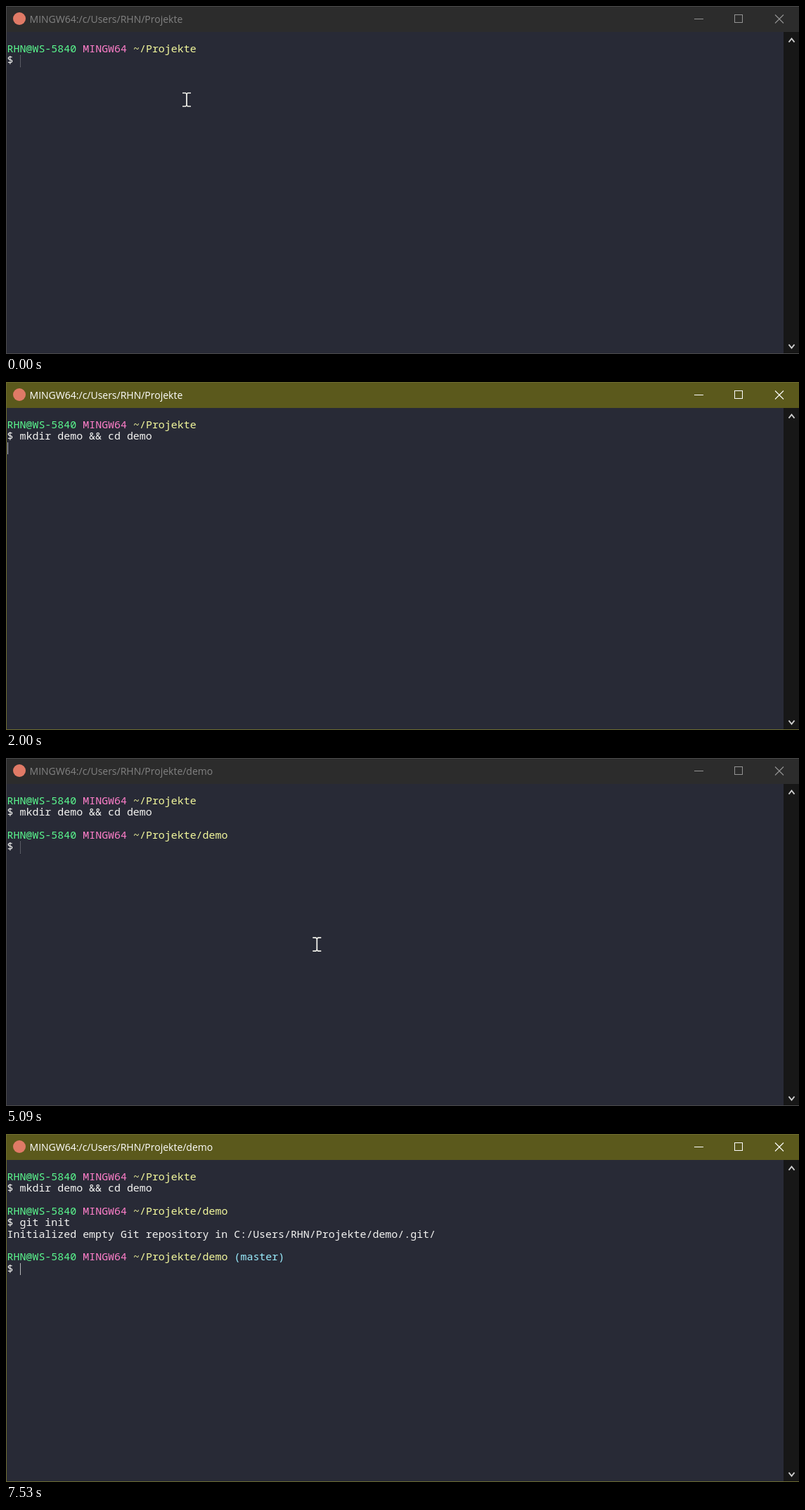
An HTML page with a canvas for the animation above (8000 ms loop, 1128x496 px).

```html
<!DOCTYPE html>
<html lang="de">
<head>
<meta charset="utf-8">
<title>Terminal</title>
<style>
  html, body { margin: 0; width: 100%; height: 100%; overflow: hidden; background: #282a36; }
  canvas { display: block; width: 1128px; height: 496px; }
</style>
</head>
<body>
<canvas id="stage" width="1128" height="496"></canvas>
<script>
const ctx = document.getElementById('stage').getContext('2d');
const W = 1128, H = 496, LOOP = 8000, BAR = 37;
const SIZE = 14.95, PITCH = 8.97, ROW = 16.33, LEFT = 1.6, TOP = 53.7;
const GREEN = '#5af78e', PINK = '#ff7fca', YELLOW = '#f4f99d', CYAN = '#9aedfe', WHITE = '#f4f4f2';
const USER = 'RHN', HOST = 'WS-5840';

const between = (t, a, b) => t >= a && t < b;

function line(points, color, width = 1) {
  ctx.strokeStyle = color;
  ctx.lineWidth = width;
  ctx.beginPath();
  points.forEach(([x, y], i) => i ? ctx.lineTo(x, y) : ctx.moveTo(x, y));
  ctx.stroke();
}

function disc(x, y, r, color) {
  ctx.fillStyle = color;
  ctx.beginPath();
  ctx.arc(x, y, r, 0, Math.PI * 2);
  ctx.fill();
}

// parts: [text, color] pairs set one after another on a character grid
function print(row, ...parts) {
  ctx.font = SIZE + 'px "Noto Sans Mono", "DejaVu Sans Mono", monospace';
  let col = 0;
  for (const [text, color] of parts) {
    ctx.fillStyle = color;
    ctx.fillText(text, LEFT + col * PITCH, TOP + row * ROW + 12.3);
    col += text.length;
  }
}

function prompt(row, path, branch = '', command = '') {
  print(row, [`${USER}@${HOST} `, GREEN], ['MINGW64 ', PINK], [path, YELLOW], [branch, CYAN]);
  print(row + 1, ['$ ' + command, WHITE]);
}

function drawWindow(focused, title) {
  ctx.fillStyle = '#282a36';
  ctx.fillRect(0, 0, W, H);
  ctx.fillStyle = focused ? '#5b591c' : '#2c2c2c';
  ctx.fillRect(0, 0, W, BAR);
  ctx.fillStyle = '#171717';
  ctx.fillRect(1106, BAR, 22, H - BAR);

  const edge = focused ? '#6d6b30' : '#4b4b4c';
  line([[0, 0.5], [W, 0.5]], edge);
  line([[0.5, 0], [0.5, H]], edge);
  line([[0, H - 0.5], [W, H - 0.5]], edge);

  disc(19, 18, 9, '#e07a66');
  ctx.font = '14px "Open Sans", "Noto Sans", sans-serif';
  ctx.fillStyle = focused ? '#ffffff' : '#828282';
  ctx.fillText(title, 33.5, 24.2);

  const icon = focused ? '#ffffff' : '#949494';
  line([[979, 18.5], [992, 18.5]], icon);
  ctx.strokeRect(1036.5, 12.5, 11, 11);
  line([[1094, 12.5], [1106, 24.5]], icon, 1.1);
  line([[1106, 12.5], [1094, 24.5]], icon, 1.1);
  line([[1113.5, 51.5], [1117.5, 46.5], [1121.5, 51.5]], '#d0d0d0', 2);
  line([[1113.5, 482.5], [1117.5, 487.5], [1121.5, 482.5]], '#d0d0d0', 2);
}

function drawCaret(row, col, focused) {
  const x = Math.floor(LEFT + 0.5 + col * PITCH) + 0.5;
  const y = Math.floor(TOP + row * ROW);
  ctx.setLineDash(focused ? [] : [1, 1]);
  line([[x, y], [x, y + 17]], focused ? '#b4b5b8' : '#898a90');
  ctx.setLineDash([]);
}

function drawPointer([x, y]) {
  const c = '#f0f0ea';
  line([[x, y - 8.5], [x, y + 8.5]], c, 1.8);
  for (const s of [-1, 1]) {
    line([[x - 6, y + s * 9.5], [x - 1.5, y + s * 9.5], [x, y + s * 8]], c, 1.6);
    line([[x + 6, y + s * 9.5], [x + 1.5, y + s * 9.5], [x, y + s * 8]], c, 1.6);
  }
}

function glide(t, start, step, count, from, to, ease = k => k) {
  const k = ease(Math.min(1, Math.max(0, Math.floor((t - start) / step) / count)));
  return from.map((v, i) => v + (to[i] - v) * k);
}

const FIRST = [250.7, 99.6], SECOND = [442.3, 265.6];

function pointerAt(t) {
  if (t < 2000) return glide(t, 0, 70, 3, [257, 133.5], FIRST);
  if (between(t, 2730, 3000)) return glide(t, 2730, 70, 2, [258, 97], [714, 212]);
  if (between(t, 4770, 6540))
    return glide(t, 4770, 64, 5, [975, 412], SECOND, k => 1 - (1 - k) ** 2);
  if (between(t, 7260, 7530)) return glide(t, 7260, 70, 2, [452, 249], [983, 141]);
  return null;
}

function caretAt(t) {
  if (t < 810) return [1, 2];
  if (t < 2000) return between(t, 1270, 1800) ? null : [1, 23];
  if (t < 2540) return t < 2460 ? [2, 0] : null;
  if (t < 5680) return between(t, 3000, 3530) ? null : [4, 2];
  if (t < 6600) return t < 6220 ? [4, 10] : null;
  if (t < 6860) return [5, 0];
  if (t < 7530) return t < 7330 ? [6, 0] : null;
  return [8, 2];
}

function draw(t) {
  const focused = between(t, 280, 3860) || t >= 5290;
  const inDemo = t >= 2540;
  drawWindow(focused, `MINGW64:/c/Users/${USER}/Projekte` + (inDemo ? '/demo' : ''));

  prompt(0, '~/Projekte', '', t >= 810 ? 'mkdir demo && cd demo' : '');
  if (inDemo) prompt(3, '~/Projekte/demo', '', t >= 5680 ? 'git init' : '');
  if (t >= 6860)
    print(5, [`Initialized empty Git repository in C:/Users/${USER}/Projekte/demo/.git/`, WHITE]);
  if (t >= 7530) prompt(7, '~/Projekte/demo', ' (master)');

  const caret = caretAt(t);
  if (caret) drawCaret(...caret, focused);

  const pointer = pointerAt(t);
  if (!pointer) return;
  drawPointer(pointer);
  const pressed = between(t, 280, 350) || between(t, 690, 810) ||
    between(t, 5290, 5360) || between(t, 5550, 5680);
  if (pressed) disc(pointer[0] - 2.4, pointer[1] - 1.1, 14.6, 'rgba(255,255,0,0.47)');
}

const begin = performance.now();
function tick() {
  draw((performance.now() - begin) % LOOP);
  requestAnimationFrame(tick);
}
tick();
</script>
</body>
</html>
```
